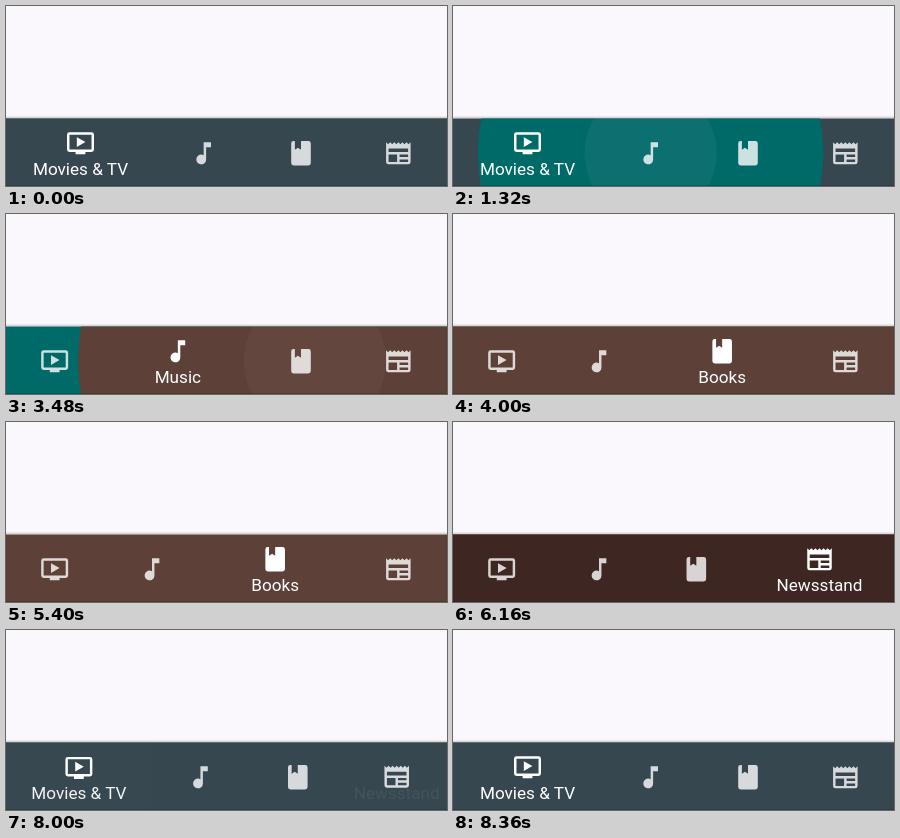
An HTML page that plays this animation: 441x180 px, repeating every 8.44 s.

```html
<!DOCTYPE html>
<html lang="en">
<head>
<meta charset="utf-8">
<title>Shifting bottom navigation</title>
<style>
  html, body { margin: 0; width: 100%; height: 100%; overflow: hidden; background: #faf8fc; }
  svg { display: block; width: 441px; height: 180px; }
  text { font: 17.15px Roboto, Arial, sans-serif; fill: #fff; text-anchor: middle; }
</style>
</head>
<body>
<svg viewBox="0 0 441 180">
  <defs>
    <clipPath id="barClip"><rect y="112.5" width="441" height="67.5"/></clipPath>
    <linearGradient id="shadow" x2="0" y2="1">
      <stop offset="0" stop-opacity="0"/>
      <stop offset="1" stop-opacity=".2"/>
    </linearGradient>
  </defs>
  <rect width="441" height="180" fill="#faf8fc"/>
  <rect y="109.5" width="441" height="3" fill="url(#shadow)"/>
  <g clip-path="url(#barClip)">
    <rect id="bar" y="112" width="441" height="68"/>
    <circle id="reveal" cy="147"/>
    <circle id="ripple" cy="147" fill="#fff"/>
    <rect y="179" width="441" height="1" opacity=".15"/>
    <g id="items"></g>
  </g>
</svg>
<script>
const LOOP = 8440, FRAME = 40;
const STAGE = 441, ACTIVE = 149, IDLE = (STAGE - ACTIVE) / 3;
const SCALE = STAGE / 360;
const REVEAL_MS = 300, SHIFT_DELAY = 200, SHIFT_MS = 360, FADE_MS = 840;

const tabs = [
  { label: 'Movies & TV', color: '#37474f',
    icon: 'M21 3H3a2 2 0 0 0-2 2v12a2 2 0 0 0 2 2h5v2h8v-2h5a2 2 0 0 0 2-2V5a2 2 0 0 0-2-2zm0 14H3V5h18zm-5-6-7 4V7z' },
  { label: 'Music', color: '#006a69',
    icon: 'M12 3v10.55A4 4 0 1 0 14 17V7h4V3z' },
  { label: 'Books', color: '#5d4037',
    icon: 'M18 22a2 2 0 0 0 2-2V4a2 2 0 0 0-2-2h-6v7L9.5 7.5 7 9V2H6a2 2 0 0 0-2 2v16a2 2 0 0 0 2 2z' },
  { label: 'Newsstand', color: '#3e2723',
    icon: 'M20 11H4V8h16zm0 4h-7v-2h7zm0 4h-7v-2h7zm-9 0H4v-6h7zm9.33-14.33L18.67 3 17 4.67 15.33 3l-1.66 1.67L12 3l-1.67 1.67L8.67 3 7 4.67 5.33 3 3.67 4.67 2 3v16a2 2 0 0 0 2 2h16a2 2 0 0 0 2-2V3z' }
];

// shown: first visible moment; start: when the tap really began
const taps = [
  { to: 1, shown: 1160, start: 1130 },
  { to: 2, shown: 3280, start: 3280, touch: 309 },
  { to: 3, shown: 5400, start: 5400 },
  { to: 0, shown: 7640, start: 7530 }
];

const byId = id => document.getElementById(id);
const clamp = v => Math.max(0, Math.min(1, v));
const mix = (a, b, p) => a + (b - a) * p;
const easeInOut = p => (1 - Math.cos(Math.PI * p)) / 2;
const easeOut = p => 1 - (1 - p) ** 2;

function make(name, parent, attrs = {}) {
  const node = document.createElementNS('http://www.w3.org/2000/svg', name);
  set(node, attrs);
  return parent.appendChild(node);
}
function set(node, attrs) {
  for (const key in attrs) node.setAttribute(key, attrs[key]);
}

const bar = byId('bar'), reveal = byId('reveal'), ripple = byId('ripple');
for (const tab of tabs) {
  tab.path = make('path', byId('items'), { d: tab.icon, fill: '#fff', 'fill-rule': 'evenodd' });
  tab.text = make('text', byId('items'), { y: 169 });
  tab.text.textContent = tab.label;
}

const idleCenter = (index, from) => IDLE * (index + .5) + (index > from ? ACTIVE - IDLE : 0);

function draw(t) {
  const tap = taps.filter(a => t >= a.shown).pop();
  const to = tap ? tap.to : 0;
  const from = tap ? (to + 3) % 4 : 0;
  const age = tap ? t - tap.start : FADE_MS;

  const origin = idleCenter(to, from);
  const reach = Math.hypot(Math.max(origin, STAGE - origin), 34);
  const open = clamp(age / REVEAL_MS);
  set(bar, { fill: tabs[open < 1 ? from : to].color });
  set(reveal, { cx: origin, r: reach * easeInOut(open), fill: tabs[to].color });

  const fade = age < 110 ? .1 : age < 200 ? mix(.1, .035, (age - 110) / 90)
    : .035 * (1 - clamp((age - 200) / 300));
  set(ripple, {
    cx: tap && tap.touch || origin,
    r: age < 110 ? age * .245 : Math.min(100, 27 + (age - 110) * .49),
    opacity: fade
  });

  const shift = easeOut(clamp((age - SHIFT_DELAY) / SHIFT_MS));
  let left = 0;
  tabs.forEach((tab, i) => {
    const on = i === to ? (from === to ? 1 : shift) : i === from ? 1 - shift : 0;
    const width = mix(IDLE, ACTIVE, on);
    const x = left + width / 2;
    left += width;
    const y = mix(147.3, 137.3, on);
    set(tab.path, {
      transform: `translate(${x} ${y}) scale(${SCALE}) translate(-12 -12)`,
      opacity: mix(.8, 1, on)
    });
    set(tab.text, { x, opacity: on });
  });
}

function tick() {
  const t = performance.now() % LOOP;
  draw(Math.floor(t / FRAME) * FRAME);
  requestAnimationFrame(tick);
}
tick();
</script>
</body>
</html>
```
